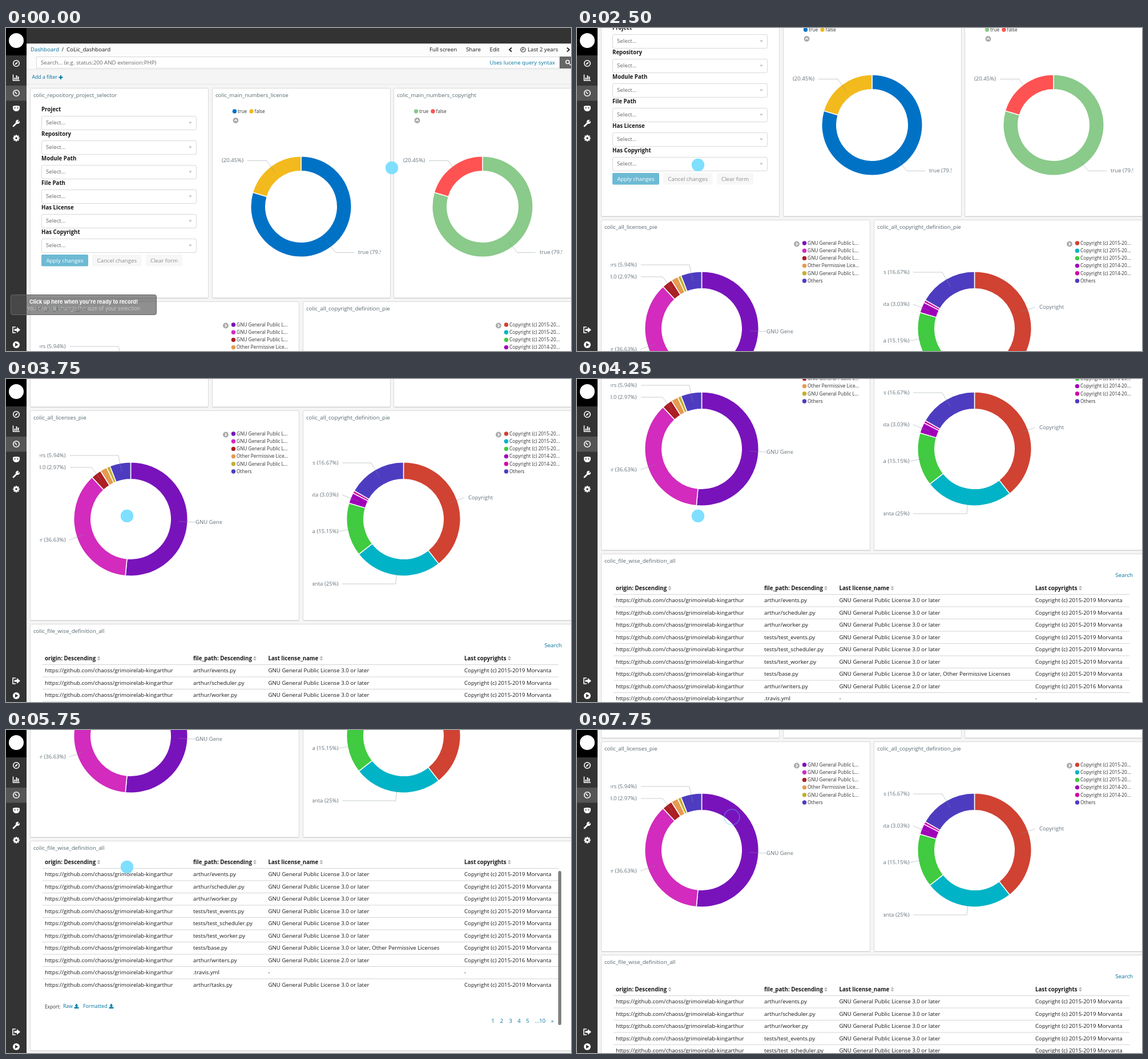
Recreate the animation shown at these times as an HTML page. Size 990 by 566 pixels, loop 8 s.

```html
<!DOCTYPE html>
<html lang="en">
<head>
<meta charset="utf-8">
<title>Dashboard</title>
<style>
html, body { margin: 0; width: 100%; height: 100%; overflow: hidden; background: #f5f5f5; }
svg { display: block; width: 100%; height: 100%; }
text { font: 9.7px "Open Sans", sans-serif; fill: #191919; }
.b { font-weight: 700; }
.title { fill: #56686f; }
.link { fill: #00719c; }
.sm { font-size: 8.3px; fill: #333; }
.md { font-size: 8.7px; }
.lab { font-size: 9.6px; fill: #66727a; }
.dim { fill: #666; }
.end { text-anchor: end; }
.mid { text-anchor: middle; }
.tip { font-family: Inter, sans-serif; font-size: 9.2px; fill: #fff; text-anchor: middle; }
.lead { fill: none; stroke: #848e96; stroke-opacity: .45; }
</style>
</head>
<body>
<svg id="stage" viewBox="0 0 990 566" preserveAspectRatio="none"></svg>
<script>
const LOOP = 8000, STEP = 250;

// y is the visual middle of the line
const text = (x, y, s, cls = '') => `<text x="${x}" y="${y}" dy=".34em" class="${cls}">${s}</text>`;
const rect = (x, y, w, h, fill, more = '') =>
  `<rect x="${x}" y="${y}" width="${w}" height="${h}" fill="${fill}" ${more}/>`;
const dot = (x, y, r, fill) => `<circle cx="${x}" cy="${y}" r="${r}" fill="${fill}"/>`;
const path = (d, fill, more = '') => `<path d="${d}" fill="${fill}" ${more}/>`;
const lead = (...p) => `<polyline class="lead" points="${p.join(' ')}"/>`;
const move = (x, y, s) => `<g transform="translate(${x} ${y})">${s}</g>`;
const clip = (id, x, y, w, h) => `<clipPath id="${id}">${rect(x, y, w, h, '#000')}</clipPath>`;
const clipped = (id, s) => `<g clip-path="url(#${id})">${s}</g>`;

function panel(x, y, w, title) {
  return rect(x + .5, y + .5, w, 367.5, '#fff', 'stroke="#d9d9d9" rx="2"') +
    path(`M${x + 1} ${y + 368.5}h${w - 1}`, 'none', 'stroke="#cfcfcf"') +
    text(x + 6, y + 13, title, 'title');
}

// radii are the visible ones; the white outline covers half its width
function donut(cx, cy, outer, inner, slices) {
  const R = outer + .75, r = inner - .75;
  let sum = 0;
  const at = (rad, p) => {
    const a = p / 50 * Math.PI;
    return (cx + rad * Math.sin(a)).toFixed(2) + ' ' + (cy - rad * Math.cos(a)).toFixed(2);
  };
  return slices.map(([pct, color]) => {
    const a = sum, b = sum += pct, big = pct > 50 ? 1 : 0;
    return path(`M${at(R, a)}A${R} ${R} 0 ${big} 1 ${at(R, b)}L${at(r, b)}A${r} ${r} 0 ${big} 0 ${at(r, a)}Z`,
      color, 'stroke="#fff" stroke-width="1.5"');
  }).join('');
}

function toggle(x, y, turn) {
  return `<g transform="translate(${x} ${y}) rotate(${turn})">${dot(0, 0, 4.9, '#a9a9a9')}` +
    path('M-2.4 1.2L0-1.3 2.4 1.2', 'none', 'stroke="#fff" stroke-width="1.5"') + '</g>';
}

const legend = (x, y, items) => items.map(([s, c], i) =>
  dot(x, y + i * 13.2, 3.7, c) + text(x + 5.6, y + i * 13.2, s, 'sm')).join('');

function header() {
  const search = 'Search... (e.g. status:200 AND extension:PHP)';
  return rect(36, 0, 954, 27.5, '#333') + rect(36, 27.5, 954, 45, '#fcfcfc') +
    path('M36 72.5H990M36 98.5H990', 'none', 'stroke="#e6e6e6"') +
    text(43, 38, 'Dashboard', 'link') + text(97.5, 38, '/') + text(106, 38, 'CoLic_dashboard') +
    text(742, 38, 'Full screen') + text(806, 38, 'Share') + text(847.5, 38, 'Edit') +
    path('M886 34.5l-4 3.5 4 3.5M983 34.5l4 3.5-4 3.5', 'none', 'stroke="#222" stroke-width="1.8"') +
    path('M910 38a4 4 0 1 0-8 0a4 4 0 1 0 8 0M906 35.5v2.8h-2', 'none', 'stroke="#2d2d2d" stroke-width="1.2"') +
    text(914, 38, 'Last 2 years') +
    rect(53.5, 50.5, 917, 20, '#fff', 'stroke="#d9d9d9"') + text(61, 60.5, search, 'dim') +
    text(847.5, 60.5, 'Uses lucene query syntax', 'link') + rect(970, 50, 20, 21, '#666') +
    path('M987 59.5a3 3 0 1 0-6 0a3 3 0 1 0 6 0M986 61.5l4 4', 'none', 'stroke="#fff" stroke-width="1.5"') +
    text(45.5, 86.5, 'Add a filter', 'md link') +
    path('M92.5 86.5h7M96 83v7', 'none', 'stroke="#0079a5" stroke-width="2"');
}

function selector() {
  const fields = ['Project', 'Repository', 'Module Path', 'File Path', 'Has License', 'Has Copyright'];
  const button = (x, w, s, fill, ink) => rect(x, 397, w, 20.5, fill, 'rx="2"') +
    `<text x="${x + w / 2}" y="411" class="mid" style="fill:${ink}">${s}</text>`;
  return panel(42, 105, 312, 'colic_repository_project_selector') +
    fields.map((s, i) => {
      const y = 143 + i * 43;
      return text(62, y, s, 'b') + rect(62.5, y + 11.5, 271, 24, '#fff', 'rx="2.5" stroke="#d9d9d9"') +
        text(70, y + 23, 'Select...', 'dim') + path(`M320 ${y + 21.5}h6l-3 3.5z`, '#c4c4c4');
    }).join('') +
    button(62, 82, 'Apply changes', '#6dbad4', '#fff') +
    button(151, 86.5, 'Cancel changes', '#f7f7f7', '#8c8c8c') +
    button(245, 64, 'Clear form', '#f7f7f7', '#8c8c8c');
}

function numbers(x, title, yes, no) {
  return panel(x, 105, 312, title) + move(x - 361, 0,
    legend(400.5, 146, [['true', yes]]) + legend(430, 146, [['false', no]]) + toggle(402.5, 162, 0) +
    donut(517, 313, 87.5, 63, [[79.55, yes], [20.45, no]]) +
    lead(423, 232.5, 457, 232.5, 471, 253) + lead(610, 393.5, 578, 393.5, 562, 374) +
    text(416, 232, '(20.45%)', 'lab end') +
    clipped('numClip', text(617, 393, 'true (79.55%)', 'lab')));
}

function licenses() {
  const gnu = 'GNU General Public L...';
  const c = ['#7813bb', '#d22bbd', '#ab1f25', '#e69a4f', '#c3b030', '#4e3cc0'];
  const pct = [51.49, 36.63, 2.97, 1.98, .99, 5.94];
  const names = [gnu, gnu, gnu, 'Other Permissive Lice...', gnu, 'Others'];
  return panel(42, 479, 471, 'colic_all_licenses_pie') + move(0, -.5, toggle(385, 522, 90) +
    legend(398.5, 520.5, names.map((s, i) => [s, c[i]])) +
    donut(218.5, 670, 99, 70.5, pct.map((p, i) => [p, c[i]])) +
    lead(112, 558.5, 197, 558.5, 203, 587) + lead(112, 579.5, 150, 579.5, 167, 602) +
    lead(111, 706.5, 138, 697) + lead(332, 675.5, 303, 674) +
    clipped('pieClip', text(104.5, 558, 'Others (5.94%)', 'lab end') +
      text(104.5, 579.5, 'License 3.0 (2.97%)', 'lab end') +
      text(104.5, 706, 'or later (36.63%)', 'lab end') + text(332, 675, 'GNU General', 'lab')));
}

const OWNER = 'Morvanta';

function copyrights() {
  const c = ['#d04232', '#00b3c6', '#40cb40', '#a000b8', '#d400a6', '#4e3cc0'];
  const pct = [39.39, 25, 15.15, 3.03, .76, 16.67];
  const names = [5, 5, 5, 4, 4].map(n => `Copyright (c) 201${n}-20...`).concat('Others');
  const label = (y, s) => text(582.5, y, s, 'lab end');
  return panel(520, 479, 480, 'colic_all_copyright_definition_pie') + move(0, -.5, toggle(863, 522, 90) +
    legend(876.5, 520.5, names.map((s, i) => [s, c[i]])) +
    donut(696.5, 670, 99, 70.5, pct.map((p, i) => [p, c[i]])) +
    lead(589, 571.5, 640, 571.5, 654, 596) + lead(589, 627.5, 618, 639) +
    lead(584, 691.5, 612, 686) + lead(589, 783.5, 683, 783.5, 685, 759) + lead(803, 632.5, 777, 641.5) +
    clipped('copyClip', label(571, 'Others (16.67%)') + label(627.5, OWNER + ' (3.03%)') +
      label(691, OWNER + ' (15.15%)') + label(783, OWNER + ' (25%)')) +
    text(810, 632, 'Copyright', 'lab'));
}

function table() {
  const cols = [68, 328, 459.5, 803];
  const heads = [['origin: Descending', 162.5], ['file_path: Descending', 436],
    ['Last license_name', 552.5], ['Last copyrights', 882]];
  const files = ['arthur/events.py', 'arthur/scheduler.py', 'arthur/worker.py', 'tests/test_events.py',
    'tests/test_scheduler.py', 'tests/test_worker.py', 'tests/base.py', 'arthur/writers.py',
    '.travis.yml', 'arthur/tasks.py'];
  const row = (f, i) => {
    const y = 935 + i * 21.5, none = f[0] === '.', old = f.includes('writers');
    const lic = `GNU General Public License ${old ? 2 : 3}.0 or later` +
      (f.includes('base') ? ', Other Permissive Licenses' : '');
    return ['https://github.com/chaoss/grimoirelab-kingarthur', f, none ? '-' : lic,
      none ? '-' : `Copyright (c) 2015-201${old ? 6 : 9} ${OWNER}`].map((s, k) => text(cols[k], y, s)).join('') +
      path(`M64 ${y - 10.5}H968`, 'none', 'stroke="#d4d4d4"');
  };
  const save = x => path(`M${x + 2.8} 1162h2.4v2.5h2l-3.2 3.2-3.2-3.2h2zM${x} 1167.5h8v2.5h-8z`, '#0079a5');
  const pages = [[853, 1], [868.5, 2], [884, 3], [899, 4], [914, 5], [936, '...10'], [957.5, '»']];
  return panel(42, 853, 960, 'colic_file_wise_definition_all') + clipped('tableClip',
    '<g id="rows">' + text(974, 890.5, 'Search', 'link end') +
    heads.map(([s, x], k) => text(cols[k], 913.5, s, 'b') +
      path(`M${x - 3} 912.8h6l-3-3.3zM${x - 3} 914.2h6l-3 3.3z`, '#b0b0b0')).join('') +
    files.map(row).join('') +
    text(68, 1167, 'Export:', 'sm') + text(100, 1166.5, 'Raw', 'md link') + save(119.5) +
    text(135, 1166.5, 'Formatted', 'md link') + save(180.5) +
    pages.map(([x, s]) => text(x, 1192, s, 'link mid')).join('') + '</g>') +
    rect(967.5, 906, 5.5, 270, '#7f7f7f', 'rx="2.7" id="thumb"');
}

function sidebar() {
  const line = 'stroke="#fff" stroke-width="1.6"';
  const icon = (y, s) => move(18, y, s);
  const ring = `<circle r="5.3" fill="none" ${line}/>`;
  const teeth = [0, 45, 90, 135].map(a => rect(-1.3, -5.8, 2.6, 11.6, '#fff', `transform="rotate(${a})"`)).join('');
  return rect(0, 0, 36, 566, '#333') + rect(0, 0, 36, 48, '#000') + dot(18, 22, 13, '#fff') +
    rect(0, 101, 36, 26.5, '#555') +
    icon(62, ring + path('M3-3L1 1-3 3-1-1z', '#fff')) +
    icon(87, path('M-5.5-5.5V5H6', 'none', line) + path('M-3.5 0h2v3.5h-2zM-.5-4h2v7.5h-2zM2.5-2h2v5.5h-2z', '#fff')) +
    icon(114, ring + path('M-2.5-2.5L1 1.5M-3.3.5h.1M3 0h.1M0-3.3h.1', 'none', line)) +
    icon(141, path('M-6-4Q0-6 6-4V0Q5 5 0 5T-6 0z', '#fff') + dot(-2.4, -1, 1.1, '#333') + dot(2.4, -1, 1.1, '#333')) +
    icon(167, path('M-5 5L1-1', 'none', 'stroke="#fff" stroke-width="2.8" stroke-linecap="round"') +
      path('M4.6-5.5L2.6-3.4 3.4-2.4 5.8-4A3.6 3.6 0 1 1 4.6-5.5z', '#fff')) +
    icon(193, teeth + dot(0, 0, 4.3, '#fff') + dot(0, 0, 1.8, '#333')) +
    icon(529, path('M-1-5H-6V5H-1', 'none', line) + path('M-3.5-1.8H1V-5L7 0 1 5V1.8H-3.5z', '#fff')) +
    icon(555, dot(0, 0, 6, '#fff') + path('M-2-3.2L3.4 0-2 3.2z', '#333'));
}

const stage = document.getElementById('stage');
stage.innerHTML = '<defs>' + clip('numClip', 600, 380, 56.5, 30) + clip('pieClip', 59, 490, 319.5, 350) +
  clip('copyClip', 537, 490, 400, 350) + clip('tableClip', 42, 876, 948, 304) + '</defs>' +
  rect(0, 0, 990, 566, '#f5f5f5') +
  '<g id="page">' + header() + selector() +
  numbers(361, 'colic_main_numbers_license', '#0072c6', '#f2ba1d') +
  numbers(679, 'colic_main_numbers_copyright', '#8aca8a', '#ff5252') +
  licenses() + copyrights() + table() + '</g>' + sidebar() +
  '<g id="tip">' + rect(8.5, 467.5, 255, 35, '#545454', 'rx="3" fill-opacity=".65" stroke="#666"') +
  '<text x="136" y="483" class="tip b">Click up here when you\'re ready to record!</text>' +
  '<text x="136" y="495" class="tip" opacity=".5">You can still change the size of your selection</text></g>' +
  '<circle id="cursor" r="11.2" fill="#7fdfff"/>' +
  '<circle id="ring" cx="271.5" cy="152.5" r="13.5" fill="none" stroke="#5fc4ff" stroke-opacity=".42" stroke-width="1.6"/>';

const [page, rows, thumb, tip, cursor, ring] =
  ['page', 'rows', 'thumb', 'tip', 'cursor', 'ring'].map(id => document.getElementById(id));

const SCROLL = [[1500, 0], [1750, 20], [2500, 143], [2750, 220], [3000, 220], [3250, 301], [4250, 547],
  [4750, 659], [6250, 659], [6500, 640], [7250, 482], [7500, 459]];
const INNER = [[5000, 0], [5500, 23], [5750, 23], [6250, 0]];
const HAND_X = [[7000, 212], [7500, 271]];
const HAND_Y = [[7000, 240], [7500, 141]];

function track(keys, t) {
  const i = keys.findIndex(k => k[0] > t);
  if (i < 0) return keys[keys.length - 1][1];
  if (i === 0) return keys[0][1];
  const [a, u] = keys[i - 1], [b, v] = keys[i];
  return u + (v - u) * (t - a) / (b - a);
}

function hand(t) {
  if (t >= 1500) return [track(HAND_X, t), track(HAND_Y, t)];
  const p = t / 1500, e = p * p * (3 - 2 * p);
  return [676 - 464 * e, 245 - 5 * e - 38 * Math.sin(Math.PI * e)];
}

const show = (el, o) => el.setAttribute('opacity', o);

function render(ms) {
  const t = Math.floor(ms % LOOP / STEP) * STEP;
  const [x, y] = hand(t);
  page.setAttribute('transform', `translate(0 ${-Math.round(track(SCROLL, t))})`);
  rows.setAttribute('transform', `translate(0 ${-track(INNER, t)})`);
  thumb.setAttribute('y', 883 + track(INNER, t));
  show(thumb, t >= 5250 && t <= 6250 ? 1 : 0);
  show(tip, t === 0 ? 1 : t === STEP ? .3 : 0);
  cursor.setAttribute('cx', x);
  cursor.setAttribute('cy', y);
  show(cursor, t < 7750 ? 1 : 0);
  show(ring, t < 7750 ? 0 : 1);
}

const start = performance.now();
function loop(now) {
  render(Math.max(0, now - start));
  requestAnimationFrame(loop);
}
render(0);
requestAnimationFrame(loop);
</script>
</body>
</html>
```
